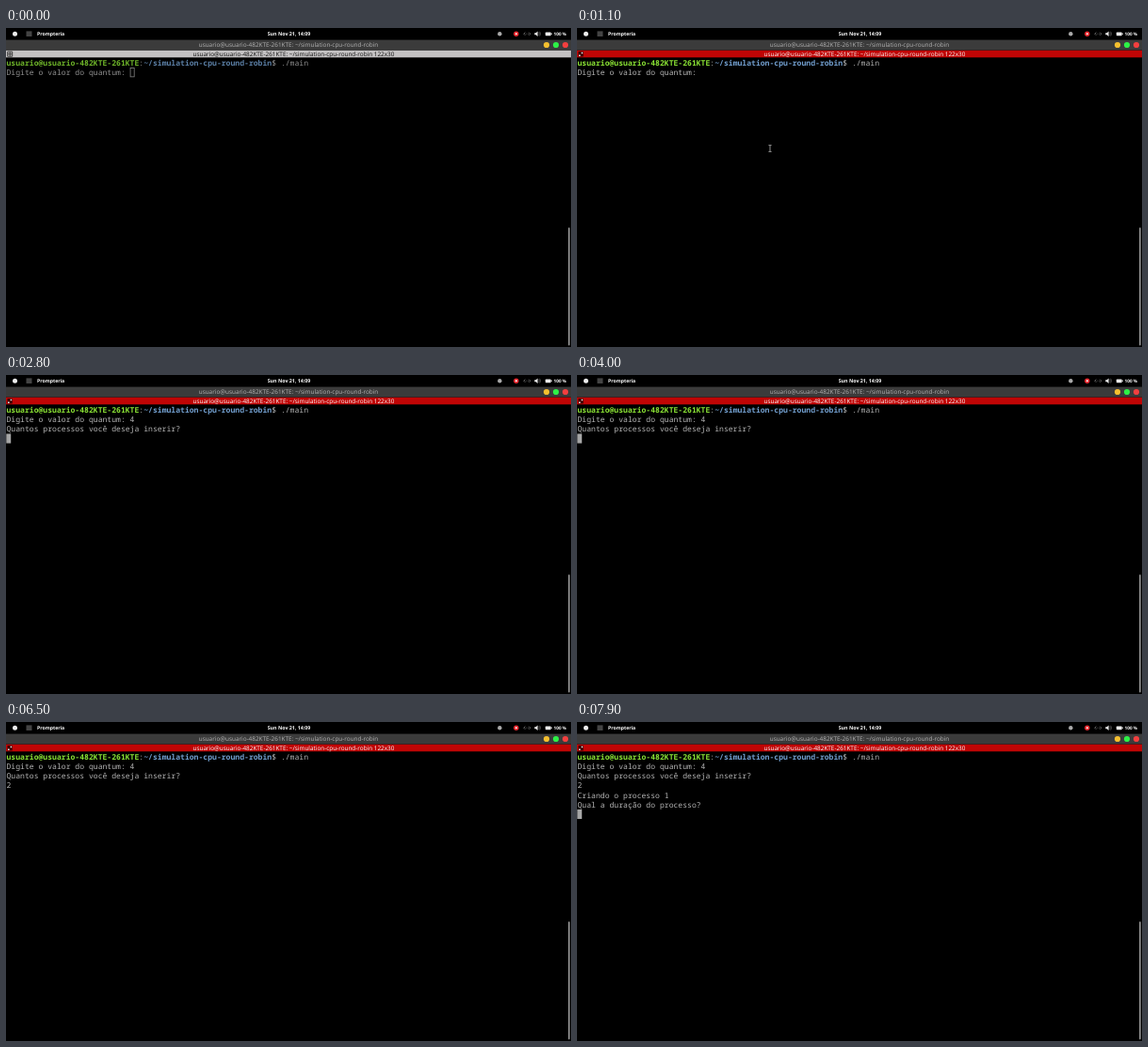
Animation of 600 by 339 pixels, one loop 8 s. Source, as an HTML page:

```html
<!DOCTYPE html>
<html lang="pt">
<head>
<meta charset="utf-8">
<title>Round robin</title>
<style>
  html, body { margin: 0; width: 100%; height: 100%; overflow: hidden; background: #000; }
  svg { display: block; width: 100%; height: 100%; }
  text { font-family: "Open Sans", "Noto Sans", sans-serif; font-size: 6.4px; text-rendering: geometricPrecision; white-space: pre; }
  .panel text { font-size: 5.15px; font-weight: 700; fill: #fff; }
  .mid { text-anchor: middle; }
  .term text { font-family: "Noto Sans Mono", "DejaVu Sans Mono", monospace; font-size: 8.11px; fill: #b4b4b4; }
  .term .user { font-weight: 700; fill: #8ae234; }
  .term .path { font-weight: 700; fill: #729fcf; }
</style>
</head>
<body>
<svg viewBox="0 0 600 339">
  <rect width="600" height="339"/>

  <g class="panel">
    <circle cx="9.5" cy="6.2" r="2.5" fill="#eee"/>
    <rect x="21.5" y="3.4" width="6" height="5.6" fill="#444"/>
    <text x="33" y="8.3">Prompteria</text>
    <text x="300.5" y="8.3" class="mid" style="font-size:5.3px">Sun Nov 21, 14:09</text>
    <circle cx="524.3" cy="6.2" r="2.2" fill="#aaa"/>
    <circle cx="541.8" cy="6.2" r="2.7" fill="#e8282f"/>
    <circle cx="541.8" cy="6.2" r="1" fill="#fff"/>
    <path d="M551.3 4.7l-1.5 1.5 1.5 1.5M555.3 4.7l1.5 1.5-1.5 1.5M551.8 6.2h.8M554 6.2h.8" fill="none" stroke="#999" stroke-width=".7"/>
    <path d="M561.3 5.2h1.4l1.9-1.7v5.4l-1.9-1.7h-1.4z" fill="#eee"/>
    <path d="M565.6 4.6q1.2 1.6 0 3.2M566.7 3.8q1.7 2.4 0 4.8" fill="none" stroke="#999" stroke-width=".5"/>
    <rect x="572.8" y="4.4" width="5.9" height="3.8" rx=".8" fill="#eee"/>
    <rect x="579" y="5.5" width=".7" height="1.6" fill="#eee"/>
    <text x="595" y="8.1" text-anchor="end" style="font-size:4.7px">100 %</text>
  </g>

  <rect y="12.6" width="600" height="11" fill="#3b3b3b"/>
  <text id="windowTitle" x="300" y="20.4" class="mid" fill="#b4b4b4"></text>
  <circle cx="574" cy="18" r="3.1" fill="#f5bf2f"/>
  <circle cx="584" cy="18" r="3.1" fill="#2df047"/>
  <circle cx="594" cy="18" r="3.1" fill="#f23f3f"/>

  <rect id="tabBar" y="23.8" width="600" height="7.5"/>
  <path id="idleIcon" d="M1.7 25.2h5v5h-5zM4.2 25.2v5M1.7 27.7h5" fill="none" stroke="#222" stroke-width=".8"/>
  <g id="liveIcon">
    <rect x="1.5" y="25" width="5.2" height="5.4" fill="#3a0000"/>
    <path d="M2 29.2h1.6M4.6 26.6h1.6" stroke="#eee" stroke-width="1.5"/>
  </g>
  <text id="tabTitle" x="305.5" y="30" class="mid"></text>

  <g id="term" class="term">
    <text x=".5" y="40"><tspan class="user" id="prompt"></tspan>:<tspan class="path" id="folder"></tspan>$ ./main</text>
    <g id="lines"></g>
    <rect id="cursor" width="4.9" height="10.1"/>
  </g>
  <path id="pointer" d="M-1.6-3.4h3.2M0-3.4v6.8M-1.6 3.4h3.2" fill="none" stroke="#b0b0b0" stroke-width=".8"/>
  <rect x="597" y="212" width="1.8" height="125.5" rx=".9" fill="#888"/>
</svg>

<script>
const LOOP = 8000, COLUMN = 4.866, ROW = 10.15, TOP = 32;
const user = "usuario@usuario-482KTE-261KTE";
const folder = "~/simulation-cpu-round-robin";
const $ = id => document.getElementById(id);

$("prompt").textContent = user;
$("folder").textContent = folder;
$("windowTitle").textContent = `${user}: ${folder}`;
$("tabTitle").textContent = `${user}: ${folder} 122x30`;

const ask = "Digite o valor do quantum: ";
const count = [ask + "4", "Quantos processos você deseja inserir?"];

// Terminal output after the command: [start, lines]; the caret follows the last line.
const screens = [
  [0, [ask]],
  [2800, [...count, ""]],
  [6000, [...count, "2"]],
  [6700, [...count, "2", "Criando o processo 1", "Qual a duração do processo?", ""]]
];
const caretToggles = [700, 1300, 1900, 2500, 3400, 4000, 4600, 4800, 5700, 5900, 6500, 6700, 7300, 7900];
// Pointer stops: [start, x, y]
const pointerStops = [[900, 286, 75], [1100, 205, 128], [1200, 166, 152], [1300, 154, 141], [1500, 162, 145.6]];

const lineNodes = Array.from({ length: 6 }, (_, i) => {
  const node = document.createElementNS("http://www.w3.org/2000/svg", "text");
  node.setAttribute("x", 0.5);
  node.setAttribute("y", 40 + ROW * (i + 1));
  return $("lines").appendChild(node);
});

const set = (id, attributes) => {
  for (const name in attributes) $(id).setAttribute(name, attributes[name]);
};
const show = (id, visible) => set(id, { visibility: visible ? "visible" : "hidden" });
const latest = (steps, t) => steps.filter(step => step[0] <= t).pop();

function draw(t) {
  const focused = t >= 100;
  set("tabBar", { fill: focused ? "#c00505" : "#c3c1c2" });
  set("tabTitle", { fill: focused ? "#fff" : "#111" });
  set("term", { opacity: focused ? 1 : 0.8 });
  show("idleIcon", !focused);
  show("liveIcon", focused);

  const lines = latest(screens, t)[1];
  lineNodes.forEach((node, i) => node.textContent = lines[i] || "");

  const inset = focused ? 0 : 0.4;
  set("cursor", {
    x: 0.3 + COLUMN * lines.at(-1).length + inset,
    y: TOP + ROW * lines.length + inset,
    width: 4.9 - 2 * inset,
    height: 10.1 - 2 * inset,
    fill: focused ? "#a6a6a6" : "none",
    stroke: focused ? "none" : "#a6a6a6",
    "stroke-width": 0.8
  });
  // Each blink or key press flips the caret.
  show("cursor", caretToggles.filter(time => time <= t).length % 2 === 0);

  const stop = latest(pointerStops, t);
  show("pointer", stop && t < 2500);
  if (stop) set("pointer", { transform: `translate(${stop[1]} ${stop[2]})` });
}

const start = performance.now();
function tick() {
  draw((performance.now() - start) % LOOP);
  requestAnimationFrame(tick);
}
tick();
</script>
</body>
</html>
```
